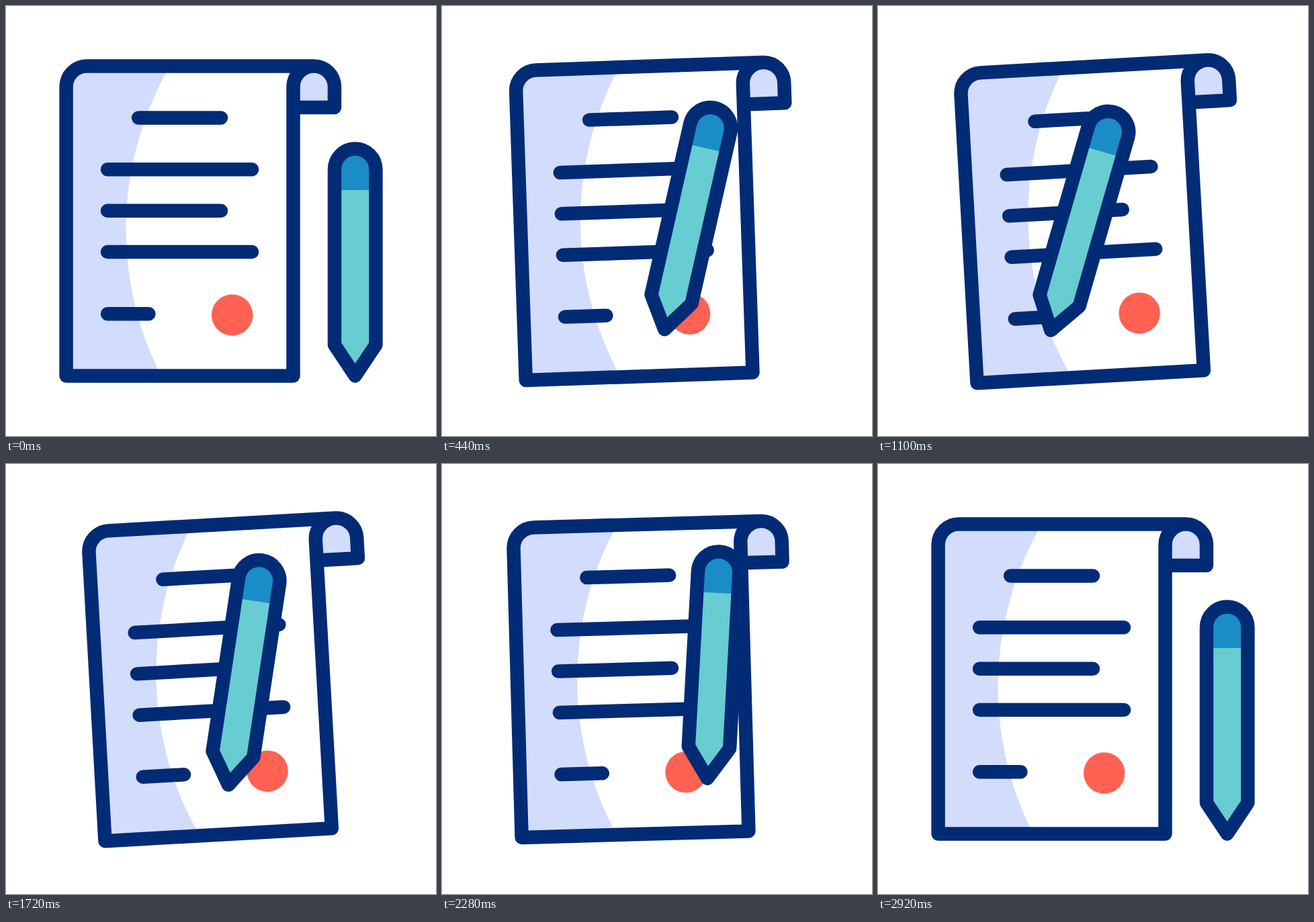
These frames come from a looping animation (640x640 px, 3600 ms). An HTML page:

```html
<!DOCTYPE html>
<html lang="en">
<head>
<meta charset="utf-8">
<title>Signing a document</title>
<style>
  html, body { margin: 0; width: 100%; height: 100%; overflow: hidden; background: #fff; }
  svg { display: block; width: 100%; height: 100%; }
  .ink { fill: none; stroke: #022b76; stroke-width: 2; stroke-linecap: round; stroke-linejoin: round; }
</style>
</head>
<body>
<svg viewBox="0 0 640 640">
  <g id="paper">
    <g transform="translate(79.36 79.36) scale(10.24)">
      <path fill="#fff" d="M1 46V4A3 3 0 0 1 4 1H37A3 3 0 0 0 34 4V46Z"/>
      <path fill="#d2dcfd" d="M1 46V4A3 3 0 0 1 4 1H16.07A47.1 47.1 0 0 0 14.79 46Z"/>
      <path fill="#d2dcfd" d="M34 7V4A3 3 0 0 1 40 4V7Z"/>
      <circle cx="25.13" cy="37.17" r="3" fill="#ff6152"/>
      <path class="ink" d="M37 1H4A3 3 0 0 0 1 4V46H34V4A3 3 0 0 1 40 4V7H34"/>
      <path class="ink" d="M11.5 8.5H23.5M7 16H28M7 22H23.5M7 28H28M7 37H13"/>
    </g>
  </g>
  <g id="pencil">
    <g transform="scale(10.24)">
      <path fill="#67cdd2" d="M-3 -12.05H3V10.5L0 15L-3 10.5Z"/>
      <path fill="#1a8dc6" d="M-3 -12V-15A3 3 0 0 1 3 -15V-12Z"/>
      <path class="ink" d="M-3 -15A3 3 0 0 1 3 -15V10.5L0 15L-3 10.5Z"/>
    </g>
  </g>
</svg>
<script>
const LOOP = 3600, ACTIVE = 2920, STEP = 20;
const STROKE = 620 / 3;
const FIRST_LOW = 1139;
const WRITE_START = FIRST_LOW - STROKE;
const WRITE_END = FIRST_LOW + 5 * STROKE;
const REST = [519.7, 396.8, 0];

const paper = document.getElementById("paper");
const pencil = document.getElementById("pencil");

// Pencil pose [x, y, angle] while scribbling to the right.
function write(t) {
  const s = t - 1100;
  const phase = 2 * Math.PI * (t - FIRST_LOW) / STROKE;
  return [
    302.5 + 0.0871 * s - 25 * Math.cos(phase - 0.28),
    323 - 0.015 * s - -32 * Math.cos(phase),
    16.1 - 0.0122 * s
  ];
}

// Smooth curve through timed poses, coming to a stop at the last one.
function spline(keys) {
  const slope = (a, b, k) => (b[1][k] - a[1][k]) / (b[0] - a[0]);
  const tangent = (i, k) => i === keys.length - 1 ? 0
    : slope(keys[Math.max(i - 1, 0)], keys[i + 1], k);
  return t => {
    let i = 0;
    while (i < keys.length - 2 && t >= keys[i + 1][0]) i++;
    const [a, from] = keys[i], [b, to] = keys[i + 1];
    const span = b - a, u = Math.min(Math.max((t - a) / span, 0), 1), v = 1 - u;
    return from.map((p, k) =>
      p * v * v * (1 + 2 * u) + to[k] * u * u * (3 - 2 * u) +
      span * u * v * (tangent(i, k) * v - tangent(i + 1, k) * u));
  };
}

const approach = spline([
  [0, REST],
  [440, [365.3, 331.5, 12.8]],
  [740, [276.4, 271.6, 20.4]],
  [WRITE_START, write(WRITE_START)]
]);

const leave = spline([
  [WRITE_END, write(WRITE_END)],
  [2280, [403.3, 314.5, 3.1]],
  [2700, [494, 379, 0.7]],
  [2900, REST]
]);

function pencilPose(t) {
  if (t < WRITE_START) return approach(t);
  return t < WRITE_END ? write(t) : leave(t);
}

function paperShift(t) {
  if (t < 900) return 1 - Math.pow(1 - t / 900, 1.4);
  return Math.min(1, Math.max(0, (2700 - t) / 835));
}

function draw(time) {
  let t = Math.floor((time % LOOP) / STEP) * STEP;
  if (t >= ACTIVE) t = 0;
  const p = paperShift(t);
  const [x, y, angle] = pencilPose(t);
  paper.setAttribute("transform", `translate(${44.7 * p} 0) rotate(${-3.2 * p} 289 320)`);
  pencil.setAttribute("transform", `translate(${x} ${y}) rotate(${angle})`);
}

let start;
function tick(now) {
  if (start === undefined) start = now;
  draw(now - start);
  requestAnimationFrame(tick);
}
draw(0);
requestAnimationFrame(tick);
</script>
</body>
</html>
```
